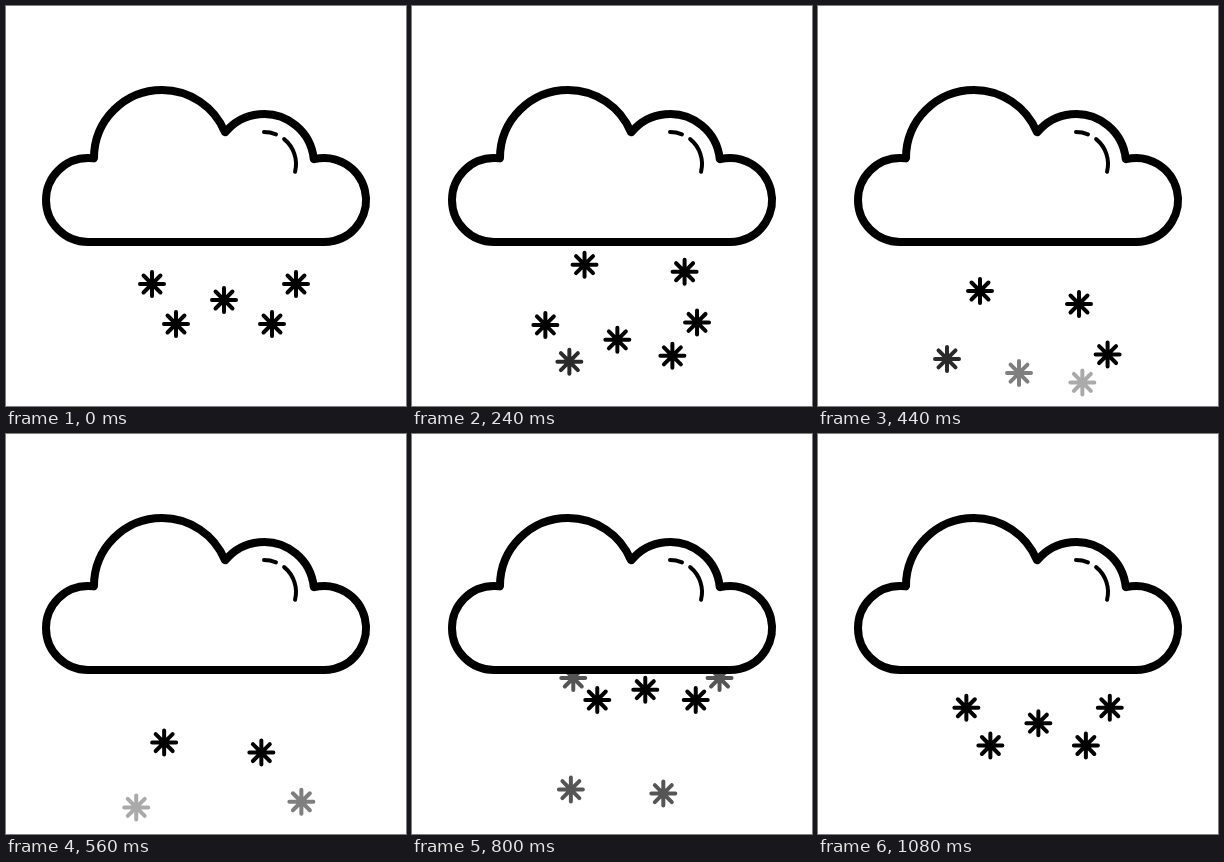
Recreate the animation shown at these times as an HTML page with a canvas. Size 400 by 400 pixels, loop 1120 ms.

```html
<!DOCTYPE html>
<html lang="en">
<head>
<meta charset="utf-8">
<title>Snow cloud</title>
<style>
html, body { margin: 0; height: 100%; overflow: hidden; background: #fff; }
canvas { display: block; }
</style>
</head>
<body>
<canvas id="stage" width="400" height="400"></canvas>
<script>
const ctx = document.getElementById('stage').getContext('2d');
const LOOP = 1120, FRAME = 40, FADE = 240;
const TOP = 227, BOTTOM = 387, SWAY = 17, SWING = 0.2; // SWING in degrees per ms
const rad = deg => deg * Math.PI / 180;
const sin = deg => Math.sin(rad(deg));

const cloud = new Path2D();
cloud.arc(82, 194, 42, rad(90), rad(-82));
cloud.arc(156, 152, 68, rad(180), rad(-22.4));
cloud.arc(258, 158, 50, rad(-140.6), rad(-5.7));
cloud.arc(318, 194, 42, rad(-103.7), rad(90));
cloud.closePath();

const shine = new Path2D();
for (const [from, to] of [[-90, -68], [-51, 14]]) {
  shine.moveTo(258 + 32 * Math.cos(rad(from)), 158 + 32 * sin(from));
  shine.arc(258, 158, 32, rad(from), rad(to));
}

// A flake passes (x, y) at time `at`; it falls from TOP for `before` ms
// and on to BOTTOM for `after` ms. `phase` is its place in the sway.
const flakes = [
  { x: 146, y: 278, at: 0, before: 480, after: 640, phase: 0 },
  { x: 170, y: 318, at: 0, before: 560, after: 440, phase: 0 },
  { x: 218, y: 294, at: 0, before: 560, after: 560, phase: 0 },
  { x: 266, y: 318, at: 0, before: 560, after: 520, phase: 42 },
  { x: 290, y: 278, at: 0, before: 480, after: 680, phase: 45 },
  { x: 162, y: 285, at: 440, before: 440, after: 520, phase: 45 },
  { x: 261, y: 298, at: 440, before: 440, after: 520, phase: 25 }
];

function drawFlake(flake, time) {
  const { before, after, phase } = flake;
  const t = time - flake.at;
  const alpha = Math.min(1, (t + before) / FADE, (after - t) / FADE);
  if (alpha <= 0) return;
  const speed = t < 0 ? (flake.y - TOP) / before : (BOTTOM - flake.y) / after;
  const x = flake.x - SWAY * (sin(t * SWING + phase) - sin(phase));
  const y = flake.y + speed * t;
  ctx.globalAlpha = alpha;
  ctx.beginPath();
  for (let angle = 0; angle < 180; angle += 45) {
    const dx = 12 * Math.cos(rad(angle)), dy = 12 * sin(angle);
    ctx.moveTo(x - dx, y - dy);
    ctx.lineTo(x + dx, y + dy);
  }
  ctx.stroke();
  ctx.globalAlpha = 1;
}

function draw(t) {
  ctx.fillStyle = '#fff';
  ctx.fillRect(0, 0, 400, 400);
  ctx.lineCap = ctx.lineJoin = 'round';
  ctx.lineWidth = 4;
  for (const flake of flakes) {
    drawFlake(flake, t);
    drawFlake(flake, t - LOOP);
  }
  ctx.fill(cloud);
  ctx.stroke(shine);
  ctx.lineWidth = 8;
  ctx.stroke(cloud);
}

const start = performance.now();
function tick() {
  const t = (performance.now() - start) % LOOP;
  draw(Math.floor(t / FRAME) * FRAME);
  requestAnimationFrame(tick);
}
tick();
</script>
</body>
</html>
```
